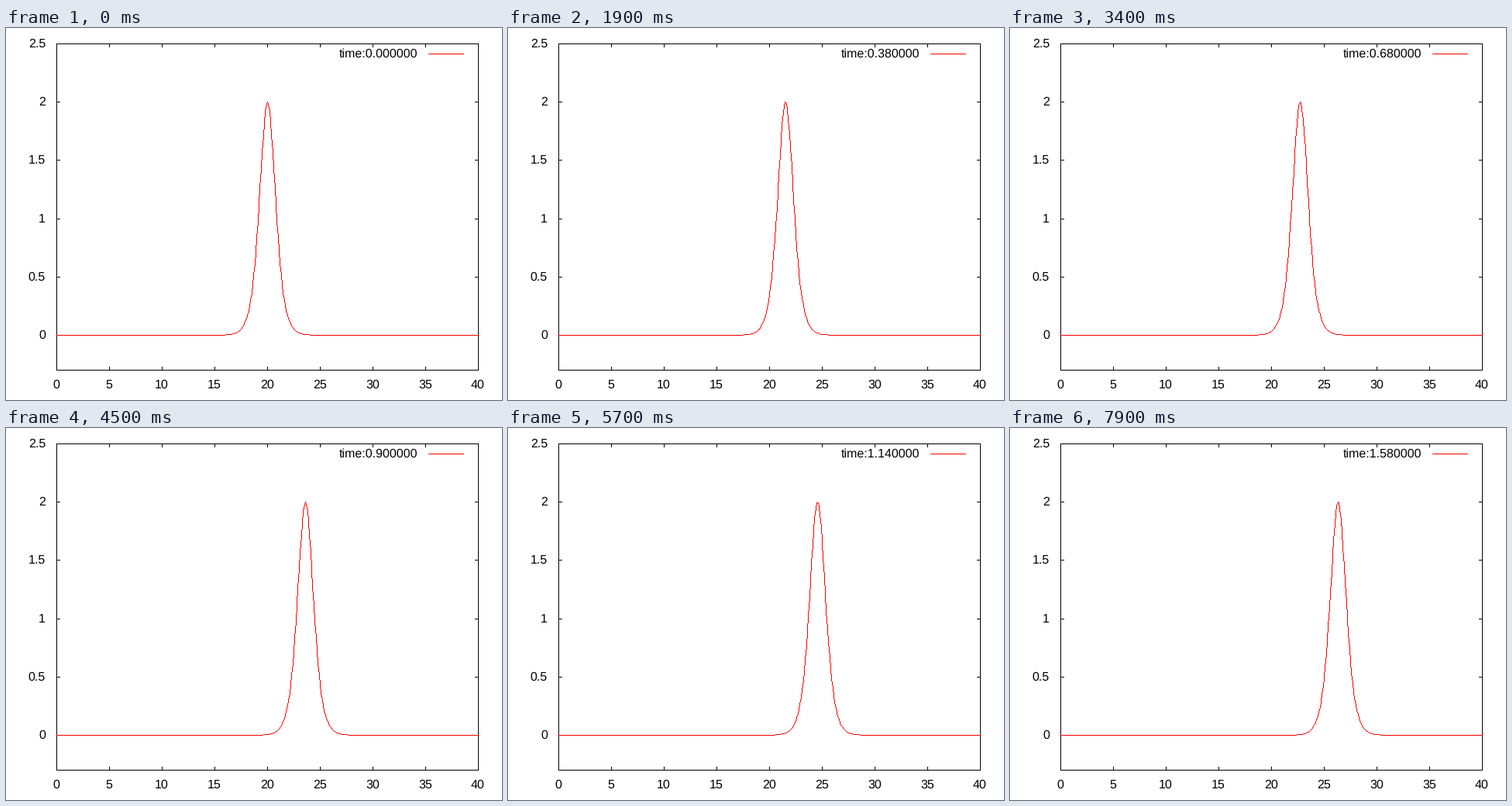
Recreate the animation shown at these times as a matplotlib script. Size 640x480 px, loop 8000 ms.

```python
import numpy as np
import matplotlib.pyplot as plt
from matplotlib.animation import FuncAnimation

W, H, DPI = 640, 480, 100
LEFT, RIGHT, TOP, BOTTOM = 65, 609, 20, 441
X_MAX, Y_MIN, Y_MAX = 40, -0.3, 2.5
FRAMES, INTERVAL, DT = 80, 100, 0.02
PX = 72 / DPI

plt.rcParams["font.family"] = "Liberation Sans"
plt.rcParams["font.size"] = 16 * PX
plt.rcParams["text.hinting"] = "none"

fig = plt.figure(figsize=(W / DPI, H / DPI), dpi=DPI, facecolor="white")
ax = fig.add_axes([0, 0, 1, 1])
ax.set_xlim(0, W)
ax.set_ylim(H, 0)
ax.axis("off")


def to_px(x, y):
    """Data coordinates to whole pixels."""
    px = LEFT + np.asarray(x) / X_MAX * (RIGHT - LEFT)
    py = BOTTOM - (np.asarray(y) - Y_MIN) / (Y_MAX - Y_MIN) * (BOTTOM - TOP)
    return np.floor(px + 0.5).astype(int), np.floor(py + 0.5).astype(int)


def raster(px, py):
    """Pixels of a one-pixel polyline, each given by its lower left corner."""
    xs, ys = [], []
    for x0, y0, x1, y1 in zip(px, py, px[1:], py[1:]):
        n = max(abs(x1 - x0), abs(y1 - y0), 1)
        s = np.arange(n + 1) / n
        xs.append(np.floor(x0 + (x1 - x0) * s + 0.5))
        ys.append(np.floor(y0 + (y1 - y0) * s + 0.5))
    return np.concatenate(xs), np.concatenate(ys) + 1


def dots(px, py, color, z=2):
    return ax.plot(*raster(px, py), ",", color=color, antialiased=False, zorder=z)[0]


def label(x, baseline, text, ha):
    return ax.text(x, baseline, text, ha=ha, va="baseline", color="black")


dots([LEFT, RIGHT, RIGHT, LEFT, LEFT], [TOP, TOP, BOTTOM, BOTTOM, TOP], "black")

for v in range(0, X_MAX + 1, 5):
    x = int(to_px(v, 0)[0])
    dots([x, x], [BOTTOM, BOTTOM - 4], "black")
    dots([x, x], [TOP, TOP + 4], "black")
    label(x, 465, f"{v}", "center")

for v in np.arange(0, 2.6, 0.5):
    y = int(to_px(0, v)[1])
    dots([LEFT, LEFT + 4], [y, y], "black")
    dots([RIGHT, RIGHT - 4], [y, y], "black")
    label(51, y + 5, f"{v:g}", "right")

dots([545, 590], [33, 33], "red")
clock = label(531, 38, "", "right")

grid = np.linspace(0, X_MAX, 401)
curve = dots([LEFT, RIGHT], [396, 396], "red", 3)


def update(i):
    t = i * DT
    wave = 2 / np.cosh(grid - 20 - 4 * t) ** 2
    curve.set_data(*raster(*to_px(grid, wave)))
    clock.set_text(f"time:{t:.6f}")
    return curve, clock


anim = FuncAnimation(fig, update, frames=FRAMES, interval=INTERVAL,
                     repeat=True, repeat_delay=0)
plt.show()
```
